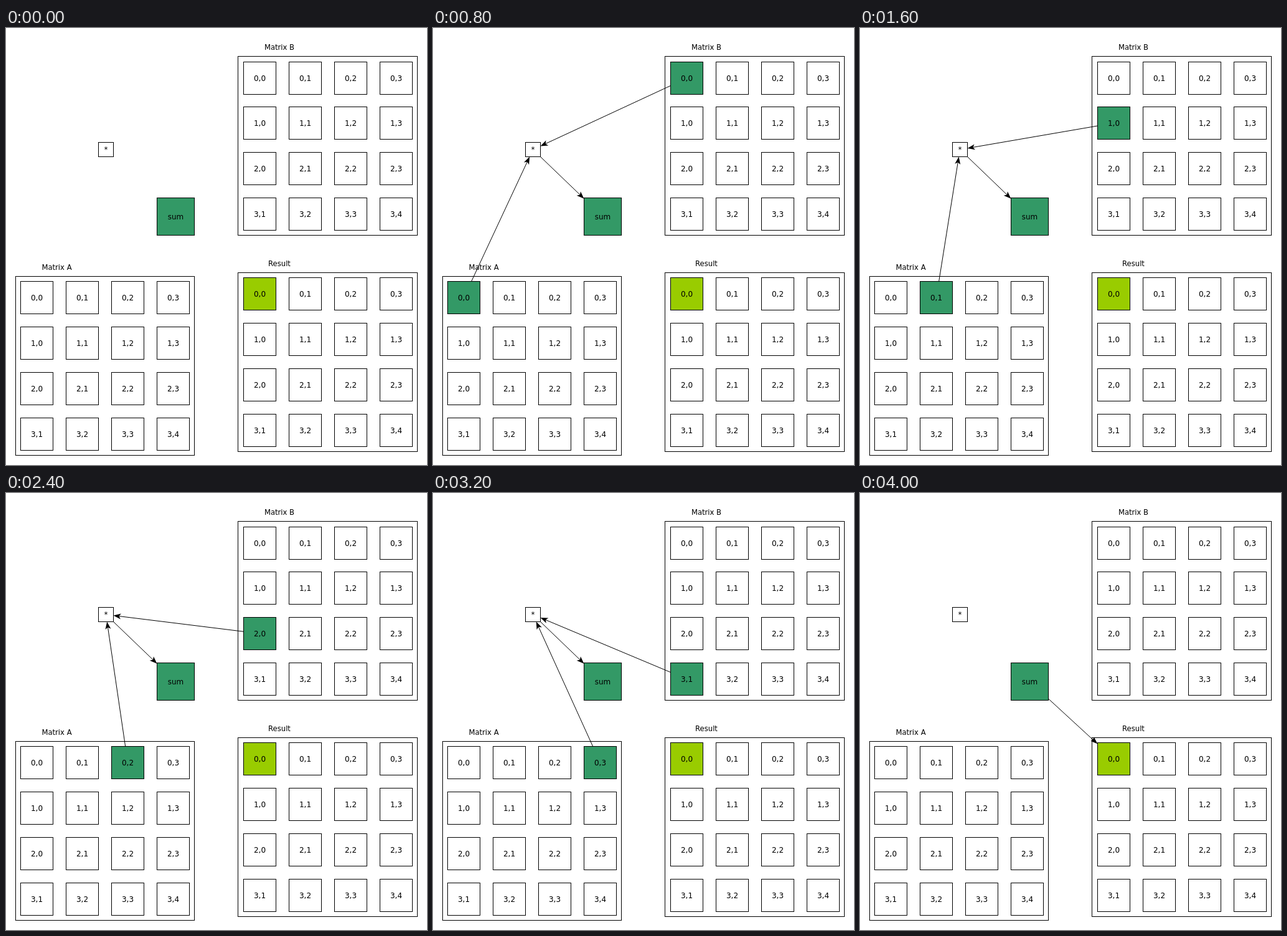
Recreate the animation shown at these times as an HTML page. Size 676 by 701 pixels, loop 4.8 s.

```html
<!DOCTYPE html>
<html lang="en">
<head>
<meta charset="utf-8">
<title>Matrix multiplication</title>
<style>
  html, body { margin: 0; width: 100%; height: 100%; overflow: hidden; background: #fff; }
  svg { display: block; }
  rect { stroke: #000; stroke-width: 1; }
  text { font: 12px "DejaVu Sans", sans-serif; text-anchor: middle; }
  .title { font-size: 11.6px; }
</style>
</head>
<body>
<svg id="stage" width="676" height="701" viewBox="0 0 676 701"></svg>
<script>
const STEP = 800, STEPS = 6;
const GREEN = '#339966', LIME = '#99cc00';
const stage = document.getElementById('stage');

function add(tag, attrs, parent = stage) {
  const el = document.createElementNS('http://www.w3.org/2000/svg', tag);
  for (const k in attrs) el.setAttribute(k, attrs[k]);
  parent.appendChild(el);
  return el;
}

// A box on the pixel grid; returns its centre and half size for clipping arrows.
function box(x, y, w, h, label, fill = '#fff') {
  const rect = add('rect', { x: x + .5, y: y + .5, width: w, height: h, fill });
  const b = { rect, cx: x + .5 + w / 2, cy: y + .5 + h / 2, hw: w / 2, hh: h / 2 };
  if (label) add('text', { x: b.cx, y: Math.round(b.cy + 4.4) }).textContent = label;
  return b;
}

function title(x, y, label) {
  add('text', { x, y, class: 'title' }).textContent = label;
}

function matrix(frame, left, rows) {
  box(...frame);
  return rows.map((y, r) => [0, 1, 2, 3].map(c =>
    box(left + 73 * c, y, 52, 52, r + ',' + (r === 3 ? c + 1 : c))));
}

// Point where the line from box b towards box o leaves b.
function edge(b, o) {
  const dx = o.cx - b.cx, dy = o.cy - b.cy;
  const k = Math.min(b.hw / Math.abs(dx), b.hh / Math.abs(dy));
  return [b.cx + dx * k, b.cy + dy * k];
}

function arrow(from, to, parent, len = 12, half = 4.5, notch = 9) {
  const [x1, y1] = edge(from, to), [x2, y2] = edge(to, from);
  const d = Math.hypot(x2 - x1, y2 - y1);
  const ux = (x2 - x1) / d, uy = (y2 - y1) / d;
  const at = (back, side) =>
    (x2 - ux * back - uy * side).toFixed(2) + ',' + (y2 - uy * back + ux * side).toFixed(2);
  add('path', { d: `M${x1},${y1}L${at(notch, 0)}`, stroke: '#000', fill: 'none' }, parent);
  add('path', { d: `M${at(0, 0)}L${at(len, half)}L${at(notch, 0)}L${at(len, -half)}Z` }, parent);
}

const b = matrix([372, 45, 288, 287], 381, [54, 126, 199, 272]);
const a = matrix([15, 398, 287, 287], 23, [406, 479, 552, 625]);
const result = matrix([372, 392, 288, 287], 381, [400, 473, 546, 619]);
const times = box(148, 183, 24, 23, '*');
const sum = box(242, 272, 60, 60, 'sum', GREEN);
result[0][0].rect.setAttribute('fill', LIME);
title(439, 35, 'Matrix B');
title(81.5, 388, 'Matrix A');
title(439, 382, 'Result');

const products = [0, 1, 2, 3].map(i => {
  const g = add('g', {});
  arrow(a[0][i], times, g);
  arrow(b[i][0], times, g);
  arrow(times, sum, g);
  return g;
});
const store = add('g', {});
arrow(sum, result[0][0], store, 11, 4, 11);

const show = (el, on) => el.setAttribute('visibility', on ? 'visible' : 'hidden');

function render(ms) {
  const step = Math.floor(ms / STEP) % STEPS;
  products.forEach((g, i) => {
    const on = step === i + 1;
    show(g, on);
    for (const cell of [a[0][i], b[i][0]]) cell.rect.setAttribute('fill', on ? GREEN : '#fff');
  });
  show(store, step === 5);
}

const start = performance.now();
function tick() {
  render(performance.now() - start);
  requestAnimationFrame(tick);
}
tick();
</script>
</body>
</html>
```
